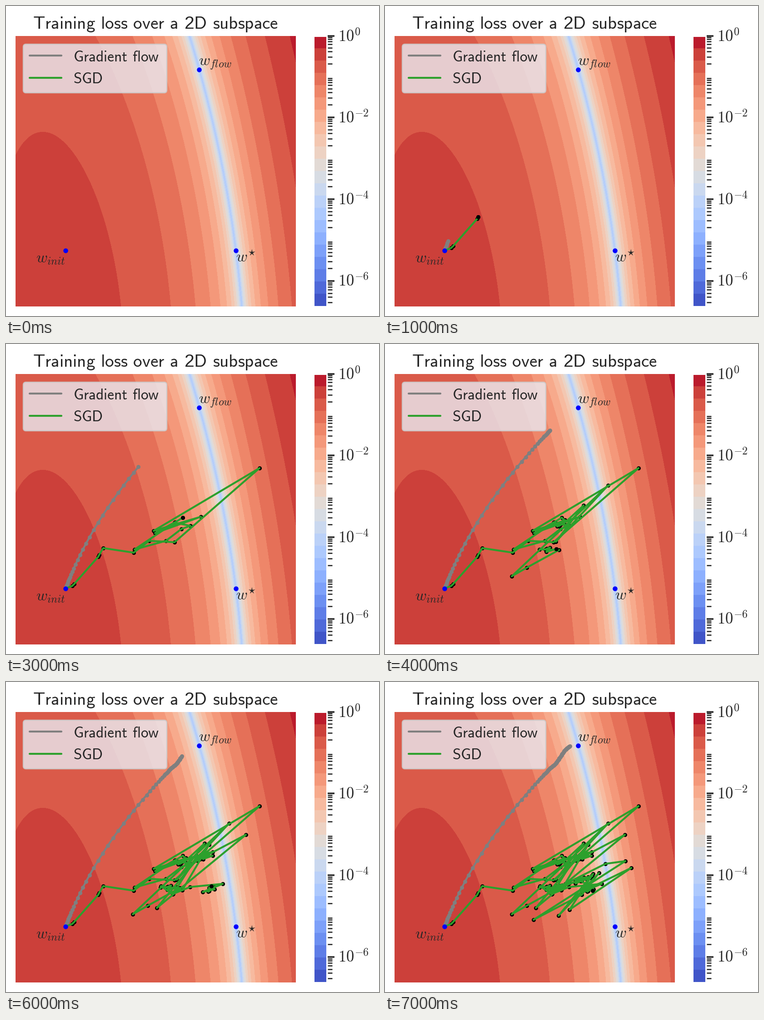
These frames come from a looping animation (821x682 px, 8000 ms). A matplotlib script:

```python
from itertools import groupby

import numpy as np
import matplotlib.pyplot as plt
from matplotlib.animation import FuncAnimation
from matplotlib.patches import FancyBboxPatch, Rectangle

W, H, DPI = 821, 682, 64
PT = 72 / DPI  # points per pixel
INK, GRAY, GREEN = "#262626", "#7f7f7f", "#2ca02c"
LEFT, RIGHT, TOP, BOTTOM = 21, 638, 66, 661

plt.rcParams["mathtext.fontset"] = "cm"
plt.rcParams["font.family"] = "Liberation Sans"
fig = plt.figure(figsize=(W / DPI, H / DPI), dpi=DPI, facecolor="white")
ax = fig.add_axes([0, 0, 1, 1])
ax.axis("off")


def sans(text):
    # The sans math font has no digits, so those come from the regular font.
    words = []
    for word in text.split():
        runs = groupby(word, str.isdigit)
        words.append("".join(r"\math%s{%s}" % ("regular" if digit else "sf", "".join(run))
                             for digit, run in runs))
    return "$" + r"\hspace{0.38}".join(words) + "$"


def label(x, y, text, size, **kw):
    ax.text(x, y, text, fontsize=size * PT, color=INK, va="baseline", zorder=8, **kw)


def stroke(xs, ys, color, width, z, cap="round"):
    return ax.plot(xs, ys, color=color, lw=width * PT, zorder=z,
                   solid_capstyle=cap, solid_joinstyle="round")[0]


def dots(xs, ys, color, size, z):
    return ax.plot(xs, ys, "o", color=color, ms=size * PT, mew=0, zorder=z)[0]


# Loss surface: the signed root of the loss is quadratic in the distance to a curved valley.
EDGES = np.arange(-21, 2) * 0.3 - 0.322
COLORS = [plt.get_cmap("coolwarm")((k + 0.5) / 22) for k in range(22)]


def log_loss(x, y):
    t = (y - TOP) / (BOTTOM - TOP)
    u = x - (404 + 181 * t - 66 * t ** 2)
    slope = (2.37 + 0.703 * t - 0.333 * t ** 2) * 1e-3
    root = slope * u + 3.4e-6 * u ** 2
    return np.log10(root ** 2 + 5e-5)


gx, gy = np.meshgrid(np.linspace(LEFT, RIGHT, 400), np.linspace(TOP, BOTTOM, 400))
ax.contourf(gx, gy, np.minimum(log_loss(gx, gy), -0.03), levels=EDGES,
            colors=COLORS, zorder=1)


# Colour bar
def bar_y(log):
    return 64.5 - 90 * log


for color, low, high in zip(COLORS, EDGES, EDGES[1:]):
    top = max(bar_y(high), 68)
    ax.add_patch(Rectangle((679, top), 25.5, bar_y(low) - top, fc=color, lw=0,
                           antialiased=False))
for decade in range(7):
    for m in range(2, 10):
        y = bar_y(np.log10(m) - 1 - decade)
        if y < BOTTOM:
            stroke([708, 718], [y, y], INK, 2.6, 2, "butt")
for power in range(0, -7, -2):
    y = max(bar_y(power), TOP)
    stroke([708, 723], [y, y], INK, 3.5, 2, "butt")
    label(731, y + 12, "$10^{%d}$" % power, 34.5)

# Title, legend and marked points
label(329, 49.5, sans("Training loss over a 2D subspace"), 38.9, ha="center")
ax.add_patch(FancyBboxPatch((38, 84), 316, 107, fc="#eaeaf2", ec="#cccccc", alpha=0.8,
                            lw=2.6 * PT, zorder=6,
                            boxstyle="round,pad=0,rounding_size=6"))
for y, color, name in ((109, GRAY, "Gradient flow"), (158, GREEN, "SGD")):
    stroke([52, 122], [y, y], color, 4.2, 7)
    label(148, y + 12.5, sans(name), 33.4)
dots([131, 425, 506], [538, 140, 538], "blue", 10.5, 7)
label(424, 130.5, "$w_{flow}$", 34)
label(505.5, 563, r"$w^{\star}$", 34)
label(66.5, 564, "$w_{init}$", 34)


# Gradient flow: a logistic rise along a bowed path, then a slow S-shaped tail
def gradient_flow(n):
    rise = 1 / (1 + np.exp(-0.19 * (n - 23.7)))
    f = (rise - rise[0]) / (1 - rise[0])
    g = np.clip((n - 50) / 50, 0, 1)
    x = 131 + 234 * f - 104 * f * (1 - f) + 42 * g
    y = 538 - 350 * f - 47 * g + 3 * np.sin(2 * np.pi * g)
    return np.column_stack([x, y])


flow = gradient_flow(np.arange(101))
FLOW_ENDS = [0, 10, 20, 30, 50, 63, 76, 100]

# SGD: long jumps between key points, with diagonal wandering in between
rng = np.random.default_rng(4)


def wander(x, y, reach, n):
    along, across = rng.uniform(-1, 1, (2, n))
    return list(zip(x + reach * along, y - 0.4 * reach * along + 7 * across))


STAGES = [
    [(131, 538)],
    [(146, 532), (150, 528), (203, 468), (205, 464)],
    [(214, 449), (281, 459), (315, 433), (371, 436), (558, 273), (325, 411),
     (429, 380), (328, 416)],
    [(372, 392), (283, 452), (352, 433), (386, 407), (406, 400), (371, 393), (389, 382)],
    wander(386, 392, 11, 9)
    + [(437, 355), (376, 435), (491, 311), (279, 511), (312, 492), (383, 453)]
    + wander(350, 453, 15, 5) + [(377, 451)],
    [(367, 467), (341, 449), (388, 458), (447, 358), (332, 497), (528, 336)],
    wander(434, 384, 24, 12) + [(368, 466), (405, 451), (477, 444), (433, 462)]
    + wander(450, 453, 11, 6) + [(452, 449)],
    wander(438, 434, 22, 14) + wander(385, 452, 24, 13)
    + [(485, 400), (529, 394), (327, 523), (433, 468), (471, 420), (382, 514),
       (458, 422), (406, 501), (542, 409)]
    + wander(440, 455, 15, 6) + [(457, 459)],
]
sgd = np.array(sum(STAGES, []), float)
SGD_ENDS = np.cumsum([len(stage) for stage in STAGES])

flow_line = stroke([], [], GRAY, 4.2, 3)
flow_dots = dots([], [], GRAY, 9, 3)
sgd_dots = dots([], [], "black", 9, 4)
sgd_line = stroke([], [], GREEN, 4.2, 5)
head = dots([], [], "black", 9, 5.5)

ax.set_xlim(0, W)
ax.set_ylim(H, 0)


def update(k):
    trail = flow[:FLOW_ENDS[k] + 1] if k else flow[:0]
    path = sgd[:SGD_ENDS[k]] if k else sgd[:0]
    for artist in (flow_line, flow_dots):
        artist.set_data(*trail.T)
    sgd_line.set_data(*path.T)
    sgd_dots.set_data(*path[1:].T)
    head.set_data(*path[-1:].T)
    return flow_line, flow_dots, sgd_line, sgd_dots, head


anim = FuncAnimation(fig, update, frames=len(STAGES), interval=1000, repeat=True, blit=False)
plt.show()
```
